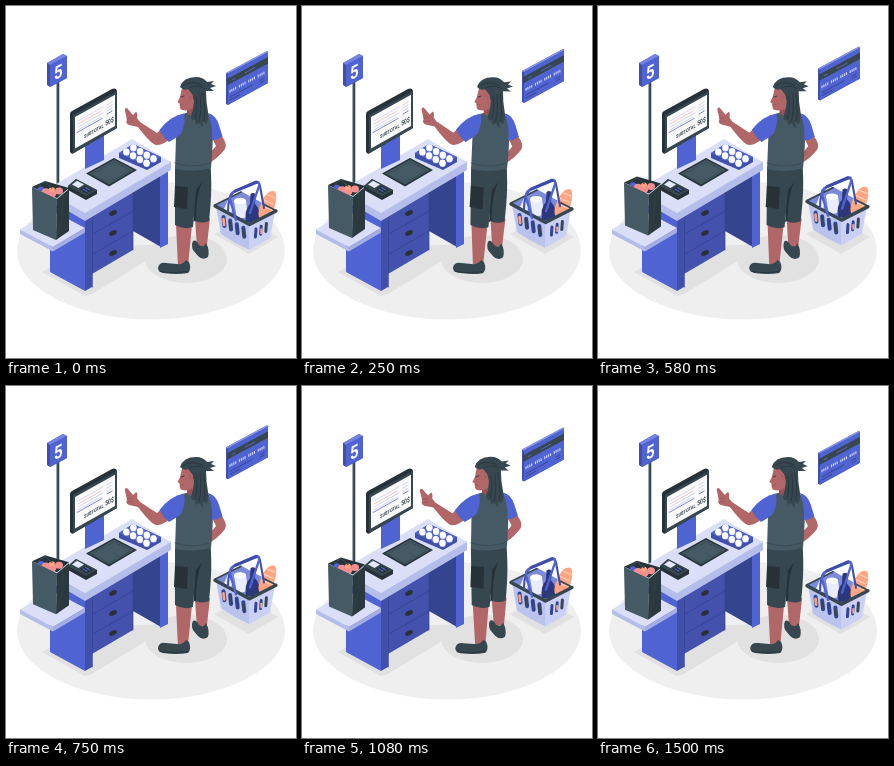
Animation of 290 by 352 pixels, one loop 1540 ms. Source, as an HTML page with a canvas:

```html
<!DOCTYPE html>
<html lang="en">
<head>
<meta charset="utf-8">
<title>Checkout</title>
<style>
html, body { margin: 0; width: 100%; height: 100%; overflow: hidden; background: #fff; }
canvas { display: block; width: 290px; height: 352px; }
</style>
</head>
<body>
<canvas id="stage"></canvas>
<script>
const canvas = document.getElementById('stage');
const ctx = canvas.getContext('2d');
const ratio = window.devicePixelRatio || 1;
canvas.width = 290 * ratio;
canvas.height = 352 * ratio;

const LOOP = 1540, TAU = Math.PI * 2;
const BLUE = '#5063d3', NAVY = '#4050aa', DEEP = '#35448f';
const PALE = '#dadef6', LILAC = '#b5bdea';
const INK = '#263238', SLATE = '#37474f', GREY = '#455a64';
const SKIN = '#b16668', SHADE = '#9a5156', PEACH = '#ffa582', CORAL = '#f28f8f';

function fill(d, color) {
  ctx.fillStyle = color;
  ctx.fill(new Path2D(d));
}
function line(d, color, width = 1) {
  ctx.strokeStyle = color;
  ctx.lineWidth = width;
  ctx.lineCap = ctx.lineJoin = 'round';
  ctx.stroke(new Path2D(d));
}
function oval(x, y, rx, ry, color, turn = 0) {
  ctx.fillStyle = color;
  ctx.beginPath();
  ctx.ellipse(x, y, rx, ry, turn, 0, TAU);
  ctx.fill();
}
function slanted(text, x, y, size, color, slope, width = 1) {
  ctx.save();
  ctx.transform(width, -slope * width, 0, 1, x, y);
  ctx.font = `bold ${size}px Roboto, sans-serif`;
  ctx.fillStyle = color;
  ctx.fillText(text, 0, 0);
  ctx.restore();
}

function floor() {
  oval(145, 244.5, 134, 69, '#efefef');
  oval(180, 253, 41, 24, '#e1e1e1');
  fill('M36 266L80 241 168 238 86 288 79 290Z', '#e1e1e1');
  fill('M208 228L239 212 272 231 243 248Z', '#e1e1e1');
}

function sign() {
  line('M52 76V180', SLATE, 2.6);
  line('M51.2 76V180', GREY, 0.8);
  fill('M41 57L57 48 61 50 61 72 44 81 41 79Z', NAVY);
  fill('M41 57L57 48 61 50 44 59Z', '#7483e3');
  fill('M44 59L61 50V72L44 81Z', BLUE);
  slanted('5', 48, 74.6, 18.5, '#fff', 0.5, 0.82);
}

function desk() {
  fill('M127 180L155 165V241L127 225Z', DEEP);
  fill('M154 168L162 164V238L154 242Z', BLUE);
  fill('M44 196L79 212V285L44 266Z', BLUE);
  fill('M79 211L86 207V281L79 285Z', NAVY);
  fill('M86 207L127 183V244L86 268Z', '#4452ae');
  for (const y of [208, 228, 248]) {
    line(`M87 ${y}L127 ${y - 23}`, DEEP, 0.8);
    oval(107, y - 1, 4.2, 2.3, INK, -0.5);
  }
  line('M86.5 209V281M127 186V244', DEEP, 0.7);

  fill('M14 223.5L46 204.5 79 222 47 241Z', PALE);
  fill('M14 223.5L47 241V245.5L14 228Z', LILAC);
  fill('M47 241L79 222V226.5L47 245.5Z', '#a4aee3');

  fill('M40 184L79 207V215L40 192Z', LILAC);
  fill('M79 206L165 155V164L79 215Z', LILAC);
  fill('M40 184L126 133 165 156 79 207Z', PALE);

  fill('M80 167.5L108 152 131 164 103 180.5Z', INK);
  fill('M83 167.5L108 153.8 128 164 103 178.5Z', GREY);
  line('M86 168L108 156 125 164.5 103 176.5Z', SLATE, 0.7);
}

function monitor() {
  fill('M79 140L98 129V154L79 163Z', BLUE);
  fill('M64 108Q64 106 66 105L106 83Q108 82 110 83L111 85V122L68 147Q66 149 64 146Z', INK);
  fill('M67 109L111 85V122L67 147Z', SLATE);
  fill('M69 111L109 88.8V120L69 142.5Z', '#fafafa');
  for (let i = 0; i < 4; i++) {
    const y = 115 + i * 3;
    line(`M72 ${y}L${97 - i % 2 * 2} ${y - 14 + i % 2}`, i === 1 ? '#edb8a5' : '#c3c9ec', 0.7);
    line(`M101 ${y - 16}L106 ${y - 19}`, i === 3 ? BLUE : '#c3c9ec', 0.8);
  }
  line('M71 126.5L96 112.5', '#7280da', 0.9);
  slanted('SUBTOTAL', 78, 132.4, 5, SLATE, 0.56, 0.8);
  slanted('50$', 99.3, 120, 7, SLATE, 0.55, 0.7);
}

function eggs() {
  fill('M113 147L127 138 155 151V156L141 164 113 152Z', NAVY);
  fill('M113 147L127 138 155 151 141 160Z', BLUE);
  for (let row = 0; row < 2; row++) {
    for (let i = 0; i < 4; i++) {
      const x = 127.5 - row * 7 + i * 6.7, y = 141.5 + row * 4.3 + i * 3.7;
      oval(x, y + 0.5, 3.2, 3.5, '#d9deef');
      oval(x - 0.2, y - 0.1, 3, 3.2, '#fff');
    }
  }
}

function terminal() {
  fill('M62 180L70 173 91 184V188L80 194 62 184Z', INK);
  fill('M62 180L70 173 91 184 80 190Z', SLATE);
  fill('M66 178.5L71 174.8 78 178.5 72.5 182Z', '#e4e8fa');
  fill('M74 183L79.5 179.6 87 183.6 80.5 187.4Z', INK);
  line('M77 183L81 185.2M79.5 181.5L83.5 183.7', BLUE, 1.1);
}

function bag() {
  fill('M26 181L39 175 63 182 51 192Z', INK);
  oval(35, 183, 3, 2.4, BLUE);
  oval(40, 186, 4.2, 3.8, CORAL);
  oval(46, 187.5, 4.4, 4, CORAL);
  oval(53, 185, 4, 3.5, CORAL);
  oval(46, 183.5, 3, 2.5, PEACH);
  line('M32 181L39 176 46 182', SLATE, 1.2);
  fill('M26 181L51 193 50 234 27 224Z', GREY);
  fill('M51 193L63 183V225L50 234Z', '#2b393f');
  line('M57 189L56 211 51 233', SLATE, 0.6);
}

function card() {
  fill('M220 67L261 45 262 46V77L222 99 220 98Z', NAVY);
  fill('M222 67.5L262 46V77L222 98.5Z', BLUE);
  line('M221 67.3L261.3 45.6', '#8f9cec', 1.3);
  fill('M221 73L262 51V57.5L221 79.5Z', SLATE);
  line('M226 74L229 72.5M239 67L249 61.5', '#5668bd', 1);
  for (let i = 0; i < 16; i++) {
    const x = 224 + i * 1.9 + Math.floor(i / 4) * 1.8;
    const y = 84.3 - (x - 224) * 0.54;
    line(`M${x} ${y}v1.9`, '#eef0ff', 0.9);
  }
  line('M224 91L246 79.2M224 94L234 88.6', DEEP, 1);
  line('M254 74.5L258 72.4M254 77L258 74.8', DEEP, 0.9);
}

function basket() {
  fill('M209 199.5L235.5 185.5 270 204.5 243.5 218.5Z', '#7c8bd9');
  fill('M218 203L222 194 226 203 225 209Z', '#eef0fb');
  fill('M228 195Q233 190 240 194L242 211 231 213Z', '#e9ecfa');
  oval(234, 195, 6, 3.2, '#fff');
  fill('M244.5 188Q247 186 249.5 188L249 198Q255 203 253 216L240 216Q238 204 244 198Z', '#2d387c');
  fill('M254 213Q250 208 256 195Q262 183 269 185.5Q272 190 268 203L263 212Z', PEACH);
  line('M258 194L267 198M256 200L266 204M262 189L269 192', '#ffcfb6', 1.2);

  fill('M210 200L243.5 218 243.5 244Q228 237 215 228Z', '#bac2ee');
  fill('M243.5 218L269 205 264 232 243.5 244Z', '#cbd1f4');
  const wares = [PEACH, SLATE, DEEP, SLATE];
  wares.forEach((color, i) => {
    const x = 217.5 + i * 6.6, y = 211 + i * 3.6;
    line(`M${x} ${y}L${x + 1} ${y + 9}`, DEEP, 4);
    line(`M${x} ${y + 2}L${x + 0.7} ${y + 8}`, color, 2.6);
  });
  for (let i = 0; i < 3; i++) {
    const x = 250 + i * 5.2, y = 223 - i * 2.8;
    line(`M${x} ${y}L${x - 0.6} ${y + 8}`, i === 2 ? SLATE : DEEP, 3);
    if (i === 1) line(`M${x} ${y + 3}v4`, PEACH, 1.8);
  }
  line('M209 200L243.5 218.5 270 205', SLATE, 3.4);
  line('M209 199L235 186M257 198L270 204.5', SLATE, 1.7);

  line('M222 206Q222 190 228 186L250 177Q253 176 254 180L258 202', NAVY, 2.1);
  line('M230 214L224 193Q223 188 229 185L250 176Q254 175 253 180L244 207', BLUE, 2.3);
  line('M229 185L250 176', '#3d4caa', 2.8);
}

function man() {
  // back leg
  fill('M189 213L204 212 201 239 191 241Z', SKIN);
  fill('M187 235Q190 233 193 239Q198 242 200 237Q204 244 202 251Q197 255 192 250L187 244Q185 239 187 235Z', SLATE);
  // front leg
  fill('M170 218L186 219 182 260 172 260Z', SKIN);
  fill('M152 262Q153 256 160 257L171 258Q177 259 180 254L183 256Q186 263 182 267Q171 269 157 267Q152 266 152 262Z', SLATE);
  line('M154 265.5Q168 268 182 265.5', INK, 0.8);
  // shorts
  fill('M180 162L204 157Q207 179 203 215Q197 218 189 215Z', SLATE);
  fill('M169 161L204 157 205 172 190 184 187 221Q178 224 169 219Z', SLATE);
  fill('M190 184L196 176Q190 190 190 214L187.5 216Z', INK);
  fill('M169 180L182 181 181 203 168 201Z', INK);
  // far arm
  fill('M205 130L215 129Q222 138 219 143Q213 151 205 156L204 147 210 140Z', SKIN);
  // torso
  fill('M171 110Q177 108 183 106L202 107Q205 113 207 121Q207 140 205 162Q187 167 169 163L170 132Q167 118 171 110Z', GREY);
  fill('M202 107Q210 109 213 119L216.5 130.5Q211 134 206 134Q207 120 202 107Z', BLUE);
  line('M169 157Q185 163 204 157', SLATE, 0.7);
  // reaching arm
  fill('M119 105Q118 102 121 102L127 109 130 106Q132 107 131 112L134 116 151 127 159 119 167 130Q157 140 150 139Q145 138 132 121L123 119Q119 117 121 114Z', SKIN);
  line('M122 116L127 115M121 113L126 112', SHADE, 0.7);
  fill('M178 107.5Q164 110 153.5 124Q157 131 163 136Q169 133 175 128Q180 118 178 107.5Z', BLUE);
  // head
  fill('M181 97L191 96 192 110Q186 112 181 107Z', SHADE);
  fill('M176 82L191 82 190 99Q184 106 176 104Q173 103 174 98L171.5 96 174 91Z', SKIN);
  line('M175 91L178 90', INK, 0.8);
  line('M174 99L177 99', SHADE, 0.8);
  // hair
  fill('M174 81Q177 71 190 71Q197 71 201 76L208 75 205 78 210 80 204 82 208 85 200 85Q200 96 202 106Q203 114 200 118L197 115 197 122 193 117 190 119 189 114 186 114Q184 110 187 104L188 95 186 88 182 83Q178 85 174 81Z', SLATE);
  oval(184, 91, 2.8, 3.8, SKIN);
  line('M184 89.5Q185.5 91 184 93', SHADE, 0.7);
  line('M190 90Q192 103 189 112M194 88Q196 103 193 115M197 87Q200 103 198 115', INK, 0.7);
  line('M178 79Q185 74 196 79M183 82Q190 78 198 82', INK, 0.7);
}

// Linear swing: 0, 1 at a quarter, -1 at three quarters, 0.
function triangle(u) {
  return 1 - 4 * Math.abs(((u + 0.25) % 1) - 0.5);
}

function draw(t) {
  const u = t / LOOP;
  const lift = -5.8 * (1 - Math.abs(1 - 2 * u));
  const sway = triangle(u) * Math.PI / 180;

  ctx.setTransform(ratio, 0, 0, ratio, 0, 0);
  ctx.fillStyle = '#fff';
  ctx.fillRect(0, 0, 290, 352);
  floor();
  sign();
  desk();
  monitor();
  eggs();
  terminal();

  ctx.save();
  ctx.translate(0, lift);
  bag();
  card();
  basket();
  ctx.restore();

  ctx.save();
  ctx.translate(169.5, 169.5);
  ctx.rotate(sway);
  ctx.translate(-169.5, -169.5);
  man();
  ctx.restore();
}

const start = performance.now();
function tick() {
  draw((performance.now() - start) % LOOP);
  requestAnimationFrame(tick);
}
tick();
</script>
</body>
</html>
```
